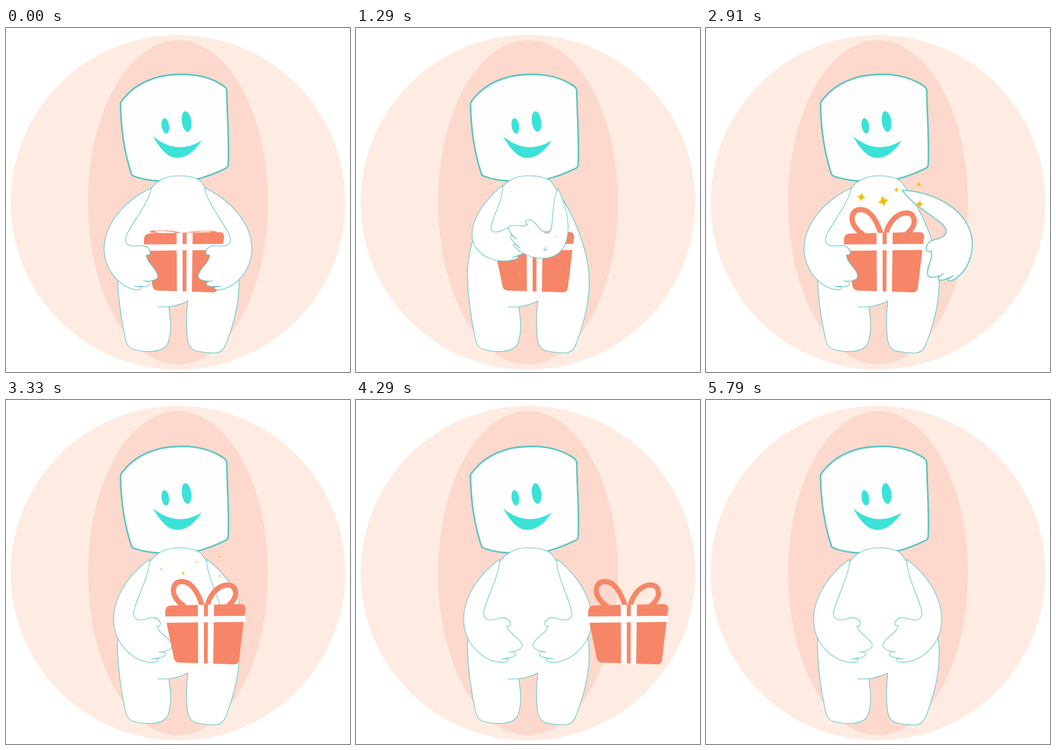
An HTML page for the animation above (6000 ms loop, 596 by 596 pixels).

```html
<!DOCTYPE html>
<html lang="en">
<head>
<meta charset="utf-8">
<title>Gift wrapping</title>
<style>
html, body { margin: 0; width: 100%; height: 100%; overflow: hidden; background: #fff; }
svg { display: block; width: 100vw; height: 100vh; }

.bg, .arm, .bow, .back, .front, .foam, .star { animation: 6s linear infinite; }
.line { fill: #fff; stroke: #5bc4c2; stroke-width: 1.1; stroke-linejoin: round; }
#arm { vector-effect: non-scaling-stroke; }
.arm {
  --home: translate(0, 0) rotate(0deg) scale(1, 1);
  --lift: translate(0, 0) rotate(0deg) scale(1, .7);
  transform-origin: 252px 277px;
  animation-name: arm;
  animation-timing-function: ease-in-out;
}
.left {
  --hug: translate(2px, -4px) rotate(-27deg) scale(1, .72);
  --rub: translate(2px, -4px) rotate(-20deg) scale(1, .72);
  --wide: var(--home);
  --rest: translate(-3px, -1px) rotate(-10.6deg) scale(1, 1);
}
.right {
  --hug: translate(-6px, 1px) rotate(-54deg) scale(1, .7);
  --rub: translate(-6px, 1px) rotate(-46deg) scale(1, .7);
  --wide: translate(4px, 4px) rotate(21deg) scale(1.03, 1);
  --rest: translate(-3.5px, -1px) rotate(-11.5deg) scale(1, 1);
  --wide-line: 1.7;
}
.bg { animation-name: lift; }
.bow { transform-origin: 0 356px; animation-name: bow; animation-timing-function: ease-in-out; }
.back { animation-name: back; }
.front { animation-name: front; }
.foam { animation-name: foam; animation-timing-function: ease-in-out; }
.star { animation-name: twinkle; }

@keyframes arm {
  0%, 0.5%, 16% { transform: var(--home); }
  9.5%, 10.7% { transform: var(--lift); }
  21%, 27% { transform: var(--rub); }
  24%, 31%, 32% { transform: var(--hug); }
  41%, 42.5% { transform: var(--home); stroke-width: 1.1; }
  48.5%, 50.83% { transform: var(--wide); stroke-width: var(--wide-line, 1.1); }
  50.84%, 100% { transform: var(--rest); stroke-width: 1.1; }
}
@keyframes lift {
  0%, 50.83% { transform: translateY(0); }
  50.84%, 100% { transform: translateY(-2px); }
}
@keyframes bow {
  0%, 22% { transform: scaleY(.12); }
  30%, 100% { transform: scaleY(1); }
}
@keyframes back {
  0%, 50.83% { visibility: visible; }
  50.84%, 100% { visibility: hidden; }
}
@keyframes front {
  0%, 50.83% { visibility: hidden; transform: translateX(0); }
  50.84% { visibility: visible; transform: translateX(0); }
  100% { visibility: visible; transform: translateX(388px); }
}
@keyframes foam {
  0%, 21.5% { transform: translate(var(--dx), var(--dy)) scale(0); }
  30%, 34.5% { transform: translate(0, 0) scale(1); }
  41.5%, 100% { transform: translate(0, 0) scale(0); }
}
@keyframes twinkle {
  0%, 42.5%, 57%, 100% { transform: scale(0); }
  46%, 50%, 54% { transform: scale(1); }
  52% { transform: scale(.6); }
}
</style>
</head>
<body>
<svg viewBox="0 0 596 596">
  <defs>
    <path id="arm" d="M252 277C206 298 170 340 170 383C171 420 198 452 230 454Q237 452 234 449L223 447Q249 450 249 443Q249 439 238 438C252 440 263 436 263 430C262 417 244 408 243 393Q250 395 250 388Q247 377 234 377C218 379 207 378 207 366C208 350 245 310 252 277Z"/>
    <path id="loops" fill="none" stroke="#f68667" stroke-width="9" d="M303 356C296 335 285 314.500 268 314.500C253 314.500 250 330 256 341C260 348 266 354 273 358M312 356C316 338 330 320.500 347 320.500C362 320.500 363 336 358 345C355 350 351 354 346 358"/>
    <g id="box">
      <path fill="#f68667" d="M239 375V365Q240 357 248 356L371 353.500Q378 354 378 362L376 375L367 450Q366 458 359 458L264 455Q256 455 254 448Z"/>
      <path fill="#fff" d="M238 375L378 374V384.500L238 386ZM295.500 355H306L306 457H296ZM313 354.500H323.500L322 458H312.500Z"/>
    </g>
    <g id="puff">
      <path fill="#86c3df" d="M-6-6Q-3-11 2-9Q7-10 9-5Q12 0 8 3Q9 8 4 9Q-1 12-4 8Q-10 8-9 3Q-12-3-6-6Z"/>
      <path fill="#cbe4f2" d="M-6-6Q-3-11 2-9Q7-10 9-5Q10 0 5 1Q4 6-1 4Q-7 6-8 1Q-11-3-6-6Z"/>
      <path fill="none" stroke="#f3f9fd" stroke-width="2.500" stroke-linecap="round" d="M-7-1Q-7-5-4-5Q-2-9 2-7M-2 0Q-1-4 3-3"/>
    </g>
    <path id="star" fill="#fbb900" d="M0-1Q.15-.15 1 0Q.15.15 0 1Q-.15.15-1 0Q-.15-.15 0-1Z"/>
  </defs>

  <g class="bg">
    <circle cx="298" cy="302" r="290" fill="#feece2"/>
    <ellipse cx="298" cy="302" rx="156" ry="281" fill="#fcd9cc"/>
  </g>

  <path fill="#fefefe" stroke="#5fc4c3" stroke-width="2.800" d="M199 129Q201 125 204 122C224 97 258 80.500 300 80.500C334 79.500 358 87 378 101Q382 104 382.500 109C383 150 387 195 385 236Q385 241 381 243Q352 257 330 262Q300 268 265 265Q242 264 222 257Q218 256 217 252C205 215 199 175 198.500 133Q198 130 199 129Z"/>
  <g fill="#3be2d8">
    <ellipse cx="276" cy="169.500" rx="6.500" ry="13.300" transform="rotate(-8 276 169.500)"/>
    <ellipse cx="312.800" cy="162" rx="8.200" ry="18" transform="rotate(-8 312.800 162)"/>
    <path d="M255 188Q296 221 339 195C327 213 313 225 297 225C280 225 267 209 255 188Z"/>
  </g>

  <path class="line" d="M251 278Q268 256 300 256Q324 256 337 265C352 284 372 318 384 348C398 384 404 412 404 440C404 475 395 512 381 548Q375 563 362 563Q345 563 328 559Q316 555 314 535Q311 505 315 473Q302 480 282 483C286 510 287 525 281 545Q276 558 255 560Q238 562 222 557Q210 554 207 539Q194 480 193 425C194 390 205 350 222 320Q234 298 251 278ZM282 483L262.500 483.300"/>

  <g class="back">
    <g class="bow"><use href="#loops"/></g>
    <use href="#box"/>
  </g>
  <g class="arm left line"><use href="#arm"/></g>
  <g transform="matrix(-1 0 0 1 596 0)"><g class="arm right line"><use href="#arm"/></g></g>
  <g class="front"><use href="#loops"/><use href="#box"/></g>
  <g id="fx"></g>
</svg>
<script>
const fx = document.getElementById('fx');

let seed = 11;
const rand = () => (seed = seed * 16807 % 2147483647) / 2147483647;

function add(parent, tag, attrs) {
  const el = document.createElementNS('http://www.w3.org/2000/svg', tag);
  for (const k in attrs) el.setAttribute(k, attrs[k]);
  return parent.appendChild(el);
}

// A fixed holder with an animated group inside it.
function place(cls, x, y, maxLead) {
  const spot = add(fx, 'g', { transform: `translate(${x} ${y})` });
  return add(spot, 'g', {
    class: cls,
    style: `--dx:${(300 - x) / 2}px;--dy:${(385 - y) / 2}px;animation-delay:${-rand() * maxLead}ms`
  });
}

// Spreads n foam pieces over an oval by the golden angle; inner is its empty core.
function spread(n, inner, rx, ry, draw) {
  for (let i = 0; i < n; i++) {
    const a = i * 2.4;
    const d = inner + (1 - inner) * Math.sqrt((i + .5) / n);
    draw(place('foam', 310 + rx * d * Math.cos(a), 404 + ry * d * Math.sin(a), 150), i);
  }
}

spread(24, .55, 102, 88, (g, i) => {
  const r = 3 + 4 * rand();
  add(g, 'ellipse', {
    rx: r, ry: r * .7, fill: i % 2 ? '#8bc6e0' : '#6fadc4',
    transform: `rotate(${rand() * 90 - 60})`
  });
});
spread(20, .1, 78, 74, g => {
  const size = .7 + 1.2 * rand() ** 2;
  add(g, 'use', { href: '#puff', transform: `rotate(${rand() * 40 - 20}) scale(${size})` });
});

// x, y, radius
for (const [x, y, r] of [[269, 293, 8], [307, 300, 10], [330, 280, 5], [369, 271, 5], [370, 305, 7]]) {
  add(place('star', x, y, 60), 'use', {
    href: '#star', transform: `rotate(${r > 9 ? -14 : 10}) scale(${r})`
  });
}
</script>
</body>
</html>
```
